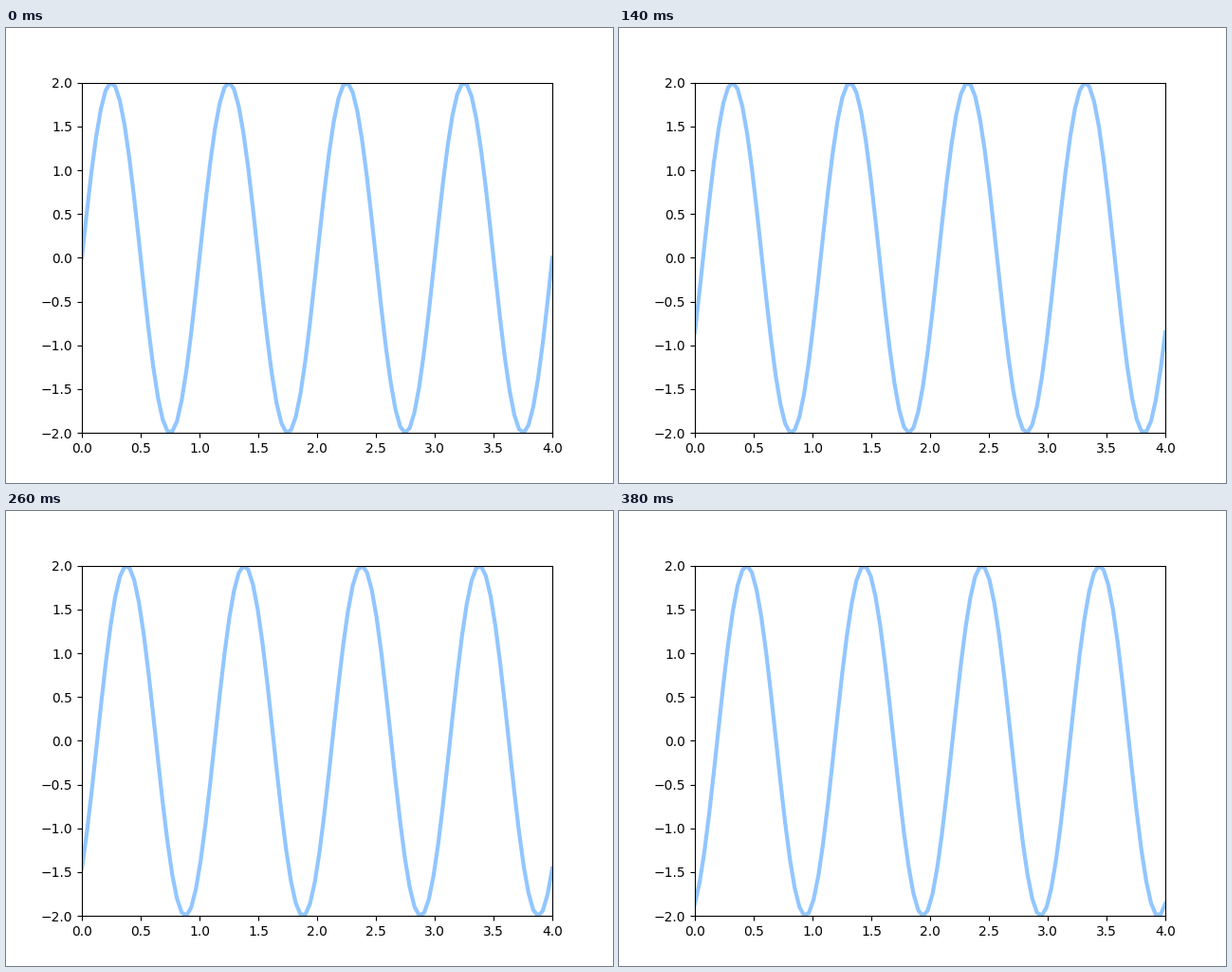
A matplotlib script that plays this animation: 640x480 px, repeating every 400 ms.

```python
import numpy as np
import matplotlib.pyplot as plt
from matplotlib.animation import FuncAnimation

FRAMES = 20
INTERVAL = 20    # ms
SHIFT = 0.01     # travel per frame, in wavelengths

plt.rcParams["font.family"] = "DejaVu Sans"

fig = plt.figure(figsize=(6.4, 4.8), dpi=100)
ax = fig.add_subplot(xlim=(0, 4), ylim=(-2, 2))
x = np.linspace(0, 4, 100)
line, = ax.plot([], [], color="#92c6ff", lw=3)


def update(i):
    """Slide the sine wave to the right."""
    line.set_data(x, 2 * np.sin(2 * np.pi * (x - SHIFT * i)))
    return line,


anim = FuncAnimation(fig, update, frames=FRAMES, interval=INTERVAL,
                     repeat=True, repeat_delay=0)

plt.show()
```
